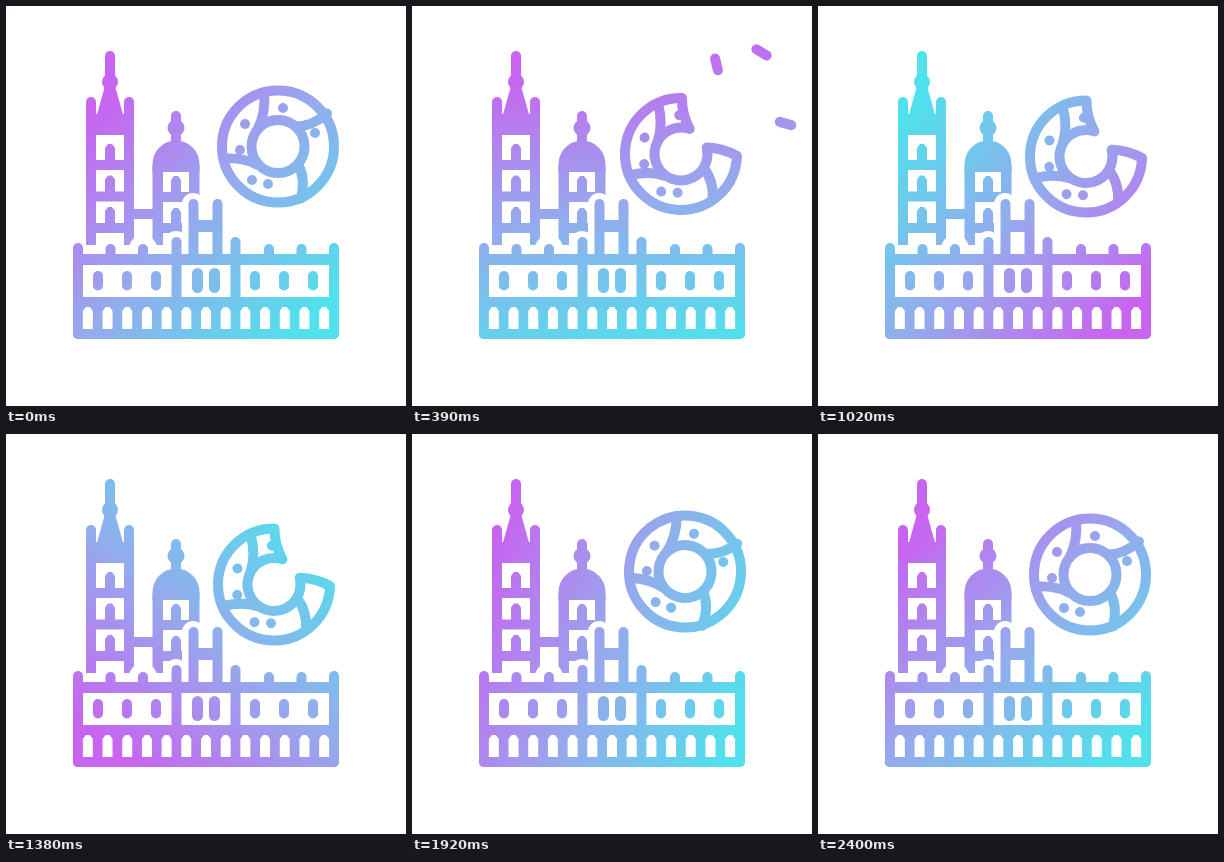
An HTML page with a canvas that plays this animation: 400x400 px, repeating every 4430 ms.

```html
<!DOCTYPE html>
<html lang="en">
<head>
<meta charset="utf-8">
<title>City and ring pastry</title>
<style>
html, body { margin: 0; width: 100%; height: 100%; overflow: hidden; background: #fff; }
canvas { display: block; width: 100vmin; height: 100vmin; }
</style>
</head>
<body>
<canvas id="stage" width="400" height="400"></canvas>
<script>
const ctx = document.getElementById('stage').getContext('2d');
const LOOP = 4430, RAD = Math.PI / 180;

// Keys: [time, value...]
const HUE_TURN = [[0, 225], [390, 259], [1020, 402], [1380, 490], [1710, 539], [1920, 563], [2400, 585]];
const POSE = [[0, 272, 140.5, 0], [390, 269, 148, -10], [600, 268, 150.5, -10.5], [1530, 268, 150.5, -10.5],
  [1650, 268.8, 148, -10.2], [1710, 271, 143, -9], [1860, 273, 137, 4], [1920, 273, 137.5, 6],
  [2160, 272.3, 139.7, 1], [2400, 272, 140.5, 0]];
const BITE = [[60, 0], [240, 1], [1590, 1], [1710, .53], [1830, 0]];
const CRUMB_SIZE = [[90, 0], [210, 1], [540, 1], [720, 0]];
const CRUMBS = [
  [[90, 298, 108, 40], [390, 304.5, 58.5, 76], [720, 305, 46, 88]],
  [[90, 302, 108, 0], [390, 349.5, 46.5, 31], [720, 359, 34, 42]],
  [[90, 304, 112, 50], [390, 373.5, 117.5, 16], [720, 378, 118.5, 6]]
];
const DOTS = [[-33, -22.5], [-38, 3.5], [-26, 33.5], [-10, 37.5], [5, -38.5], [37, -13.5]];
const SEAMS = [[-20, -18, -12, -34, -14, -54], [-54, 12, -34, 11, -21, 18],
  [20, 18, 28, 32, 23, 52], [18, -20, 34, -20, 49, -33]];

// Smooth curve through keys without overshoot
function at(keys, t) {
  const n = keys.length - 1;
  if (t <= keys[0][0]) return keys[0].slice(1);
  if (t >= keys[n][0]) return keys[n].slice(1);
  let i = 0;
  while (t >= keys[i + 1][0]) i++;
  const span = keys[i + 1][0] - keys[i][0], u = (t - keys[i][0]) / span;
  return keys[i].slice(1).map((a, k) => {
    const c = k + 1, b = keys[i + 1][c];
    const rate = j => (keys[j + 1][c] - keys[j][c]) / (keys[j + 1][0] - keys[j][0]);
    const slope = j => {
      if (j === 0 || j === n) return 0;
      const p = rate(j - 1), q = rate(j);
      return p * q > 0 ? 2 * p * q / (p + q) : 0;
    };
    const m = slope(i) * span, w = slope(i + 1) * span;
    return a + m * u + (3 * (b - a) - 2 * m - w) * u * u + (2 * (a - b) + m + w) * u ** 3;
  });
}

function gradient(angle) {
  const x = Math.cos(angle * RAD) * 150, y = Math.sin(angle * RAD) * 150;
  const g = ctx.createLinearGradient(204 + x, 202 + y, 204 - x, 202 - y);
  g.addColorStop(0, '#c864f0');
  g.addColorStop(.5, '#94abed');
  g.addColorStop(1, '#50e1ec');
  return g;
}

let ink;
function use(color) { ctx.fillStyle = ctx.strokeStyle = color; }
function box(x1, y1, x2, y2) { ctx.fillRect(x1, y1, x2 - x1, y2 - y1); }
function post(x, y1, y2, w = 10) {
  ctx.lineWidth = w;
  ctx.beginPath();
  ctx.moveTo(x, y1);
  ctx.lineTo(x, y2);
  ctx.stroke();
}
function shape(...p) {
  ctx.beginPath();
  for (let i = 0; i < p.length; i += 2) ctx.lineTo(p[i], p[i + 1]);
  ctx.fill();
}
function disc(x, y, r) {
  ctx.beginPath();
  ctx.arc(x, y, r, 0, 7);
  ctx.fill();
}
function arch(x, top, bottom, h = 5) {
  shape(x - h, bottom, x - h, top + 4, x - 2, top, x + 2, top, x + h, top + 4, x + h, bottom);
}

function tallTower() {
  post(104, 50, 84);
  disc(104, 76, 8);
  shape(99, 80, 109, 80, 118, 112, 90, 112);
  post(85, 96, 240);
  post(123, 96, 240);
  box(85, 108, 123, 129);
  for (const y of [159, 190.5, 222]) {
    box(85, y - 5, 123, y + 5);
    arch(104, y - 21, y);
  }
  box(123, 203, 150, 213);
}

function domeTower() {
  post(170, 110, 140);
  ctx.beginPath();
  ctx.ellipse(170, 122, 8.5, 8, 0, 0, 7);
  ctx.fill();
  ctx.beginPath();
  ctx.arc(170, 158, 23.5, Math.PI, 0);
  ctx.lineTo(193.5, 166);
  ctx.lineTo(146.5, 166);
  ctx.fill();
  box(146.5, 160, 157, 240);
  box(183, 160, 193.5, 200);
  box(150, 186, 190, 196);
  box(150, 217, 180, 227);
  arch(170, 170, 190);
  arch(170, 202, 220);
}

function facade() {
  use('#fff');
  box(60, 239, 340, 249);
  post(137, 243, 260, 28);
  post(170, 236, 260, 22);
  post(187, 198, 260, 22);
  post(211, 198, 260, 22);
  use(ink);
  for (const x of [72, 328]) post(x, 242, 328);
  for (const x of [170.5, 229.5]) post(x, 236, 328);
  for (const x of [104.5, 137, 263, 295.5]) post(x, 243, 252);
  for (const x of [187.5, 211.5]) post(x, 198, 252);
  box(187, 214, 211, 226);
  box(72, 248, 328, 259);
  box(72, 291, 328, 328);
  post(72, 328, 328);
  ctx.lineWidth = 10;
  ctx.strokeRect(72, 254, 256, 74);
  for (const x of [92, 121, 150, 249, 278, 307]) post(x, 270, 279.5);
  for (const x of [191.5, 208.5]) post(x, 267.5, 281.5, 11);
  use('#fff');
  for (let i = 0; i < 13; i++) arch(72 + (i + .5) * 256 / 13, 301, 323);
  use(ink);
}

function ringPath(g) {
  const turn = a => (-33 + a * g) * RAD;
  const pt = (r, a) => [Math.cos(a) * r, Math.sin(a) * r];
  const o1 = turn(-46), o2 = turn(45), i1 = turn(-28), i2 = turn(29);
  ctx.beginPath();
  ctx.arc(0, 0, 56, o2, o1 + 2 * Math.PI);
  ctx.quadraticCurveTo(...pt(40, turn(-46)), ...pt(26.5, i1));
  ctx.arc(0, 0, 26.5, i1 + 2 * Math.PI, i2, true);
  ctx.quadraticCurveTo(...pt(42, turn(35)), ...pt(56, o2));
  ctx.closePath();
}

function pastry(t) {
  const [x, y, rot] = at(POSE, t), [g] = at(BITE, t);
  // Outlines are traced in a turned frame but painted with the fixed gradient
  const turned = draw => {
    ctx.save();
    ctx.translate(x, y);
    ctx.rotate(rot * RAD);
    draw();
    ctx.restore();
  };
  const paint = (trace, fill) => {
    turned(trace);
    fill ? ctx.fill() : ctx.stroke();
  };
  const circle = r => paint(() => {
    ctx.beginPath();
    ctx.arc(0, 0, r, 0, 7);
  });
  ctx.save();
  ctx.lineWidth = 10;
  if (g > .01) {
    turned(() => ringPath(g));
    ctx.clip();
  }
  for (const [x1, y1, cx, cy, x2, y2] of SEAMS) paint(() => {
    ctx.beginPath();
    ctx.moveTo(x1, y1);
    ctx.quadraticCurveTo(cx, cy, x2, y2);
  });
  for (const [dx, dy] of DOTS) paint(() => {
    ctx.beginPath();
    ctx.arc(dx, dy, 5, 0, 7);
  }, true);
  ctx.restore();
  ctx.lineWidth = 10;
  if (g > .01) paint(() => ringPath(g));
  else {
    circle(56);
    circle(26.5);
  }
}

function crumbs(t) {
  const [s] = at(CRUMB_SIZE, t);
  if (s < .02) return;
  ctx.lineWidth = 10 * s;
  for (const keys of CRUMBS) {
    const [x, y, a] = at(keys, t);
    const dx = Math.cos(a * RAD) * 6 * s, dy = Math.sin(a * RAD) * 6 * s;
    ctx.beginPath();
    ctx.moveTo(x - dx, y - dy);
    ctx.lineTo(x + dx, y + dy);
    ctx.stroke();
  }
}

const start = performance.now();
function frame() {
  const t = (performance.now() - start) % LOOP;
  use('#fff');
  box(0, 0, 400, 400);
  ctx.lineCap = ctx.lineJoin = 'round';
  ink = gradient(at(HUE_TURN, t)[0]);
  use(ink);
  tallTower();
  domeTower();
  facade();
  pastry(t);
  crumbs(t);
  requestAnimationFrame(frame);
}
frame();
</script>
</body>
</html>
```
